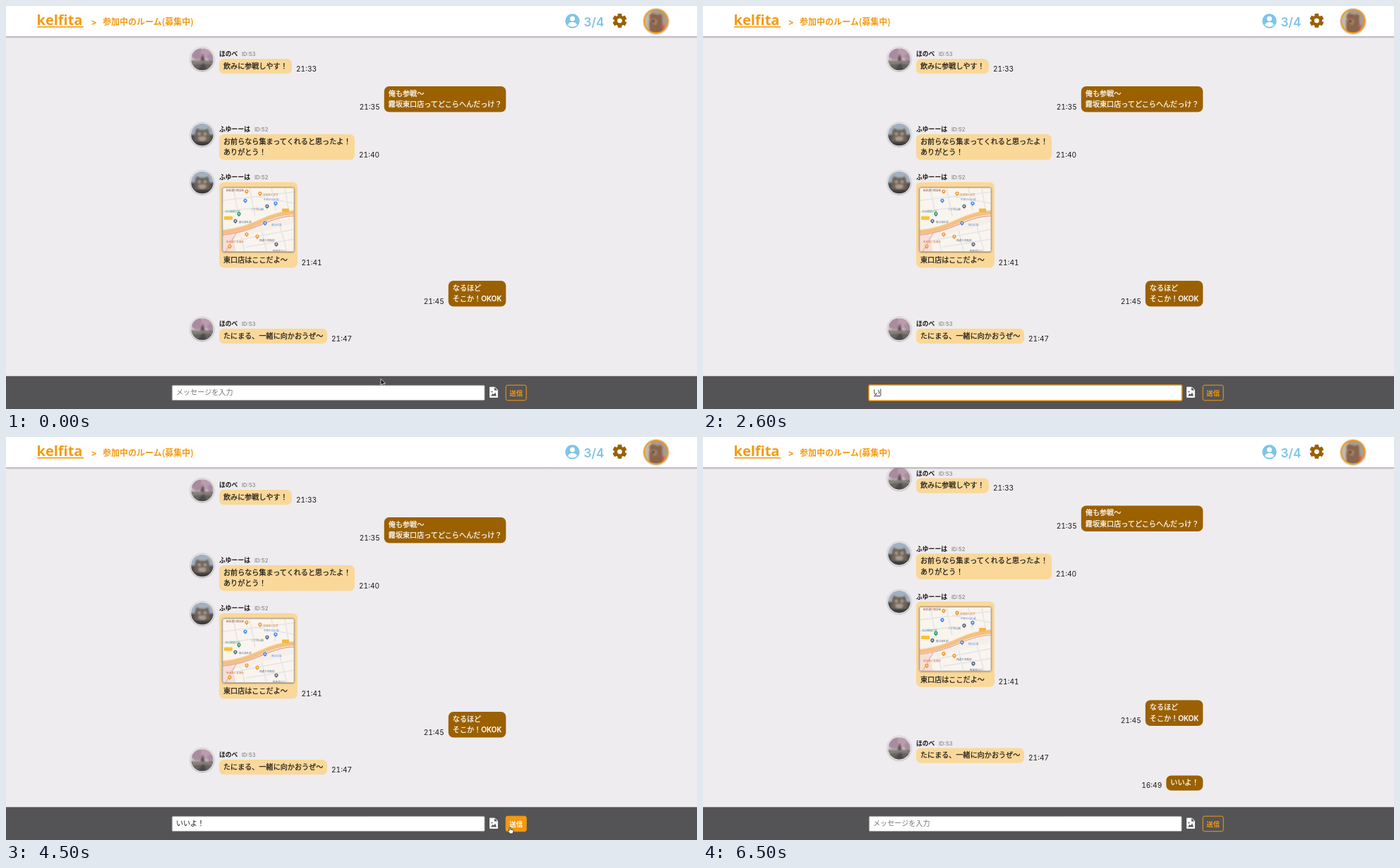
These frames come from a looping animation (979x572 px, 6.6 s). An HTML page:

```html
<!DOCTYPE html>
<html lang="ja">
<head>
<meta charset="utf-8">
<style>
html, body { margin: 0; width: 100%; height: 100%; overflow: hidden; }
svg { display: block; font: 500 10.1px Inter, "Noto Sans CJK JP", sans-serif; }
text { white-space: pre; }
.jp { font-family: "Noto Sans CJK JP", sans-serif; }
.bold { font-weight: 700; }
.time { font-size: 10.2px; font-weight: 400; font-variant-numeric: tabular-nums; }
.id { font-size: 7.6px; font-weight: 600; }
.head { font: 700 20px "Noto Sans", "Open Sans", sans-serif; }
.tiny { font-size: 3.6px; }
</style>
</head>
<body>
<svg id="stage" width="979" height="572" viewBox="0 0 979 572"></svg>
<script>
const ORANGE = '#f59a10', BROWN = '#9b6000', CREAM = '#fad899', INK = '#1d1b19', BLUE = '#7fc4e6';
const stage = document.getElementById('stage');

const rect = (x, y, w, h, fill, r = 0, more = '') =>
  `<rect x="${x}" y="${y}" width="${w}" height="${h}" rx="${r}" fill="${fill}" ${more}/>`;
const disc = (x, y, r, fill, more = '') => `<circle cx="${x}" cy="${y}" r="${r}" fill="${fill}" ${more}/>`;
const path = (d, fill, more = '') => `<path d="${d}" fill="${fill}" ${more}/>`;
// y is the vertical middle of the line
const text = (x, y, s, fill = INK, more = 'class="jp"') =>
  `<text x="${x}" y="${y + 3.7}" fill="${fill}" ${more}>${s}</text>`;
// text of medium weight
const chatText = (x, y, s, fill = INK) =>
  text(x, y, s, fill, `stroke="${fill}" stroke-width=".25"`);

const photos = {
  tree: rect(-18, -18, 36, 36, '#cfc6cd') + disc(-7, -8, 9, '#a98a9e') + disc(6, -9, 8, '#bb9cae') +
    disc(12, -3, 5, '#a98d9f') + rect(-18, 2, 36, 16, '#67625f') + path('M-3 2L1-8 4 2z', '#5c4c52') +
    path('M-18 4Q0 0 18 5V8Q0 4-18 9z', '#86817a') + path('M-10 18L2 5 8 18z', '#4b4849'),
  cat: rect(-18, -18, 36, 36, '#a4b0c0') + rect(-18, 0, 36, 18, '#51504e') +
    path('M-10 11Q-12-7-7-9L-3-7H4L8-9Q12-2 10 11z', '#6f6458') +
    disc(-4, -1, 2.3, '#a89b8a') + disc(4, -1, 2.3, '#a89b8a') +
    path('M-6 4Q0 1 6 4L4 9H-4z', '#a79c90') + rect(-18, 10, 36, 8, '#3c3d40'),
  animal: rect(-18, -18, 36, 36, '#a99c8f') + rect(-18, -18, 11, 36, '#c3b8ac') +
    path('M-9 18Q-11 4-9-4-11-10-6-11-1-11 2-9 8-12 9-7 8-2 11 18z', '#8a654d') +
    path('M-8-2Q-3-6 2-1L0 5Q-5 6-8-2z', '#a98266') + disc(-4, 0, 2, '#4a352c') +
    path('M7 10L13 4 11 12z', '#e24a4a')
};
const portrait = kind => `<g clip-path="url(#round)"><g filter="url(#blur)">${photos[kind]}</g></g>`;
const photo = (kind, x, y) => `<g transform="translate(${x} ${y})" filter="url(#soft)">` +
  disc(0, 0, 16.6, '#f7f5f5') + portrait(kind) + '</g>';

function bubble(x, y, w, lines, time, mine) {
  const h = 6 + lines.length * 15.3, ty = y + h - 7.2;
  return rect(x, y, w, h, mine ? BROWN : CREAM, 7) +
    lines.map((s, i) => chatText(x + 6, y + 10.2 + i * 15.3, s, mine ? '#fff' : INK)).join('') +
    text(mine ? x - 6 : x + w + 6, ty, time, INK, `class="time" ${mine ? 'text-anchor="end"' : ''}`);
}
const sender = (kind, y, name, id) => photo(kind, 278, y + 7.5) +
  text(302, y - .4, name, INK, 'class="jp bold" font-size="8.8"') +
  text(kind === 'tree' ? 334 : 352, y - .3, 'ID:' + id, '#929092', 'class="id"');

function map() {
  const road = (d, w = 1.3, c = '#e4e5e8') => path(d, 'none', `stroke="${c}" stroke-width="${w}"`);
  const pin = ([x, y, c]) => path(`M${x} ${y + 4}L${x - 2.4} ${y + .6}H${x + 2.4}z`, c) +
    disc(x, y, 2.6, c) + disc(x, y, .9, '#fff');
  const label = (x, y, s, c) => text(x, y - 2, s, c, 'class="jp tiny"');
  const blue = '#4b8be8', amber = '#f3992e', slate = '#5d6a83';
  return rect(306.5, 257.5, 102, 91.5, '#f9f4ee', 2, 'filter="url(#soft)"') +
    '<g clip-path="url(#mapBox)">' +
    road('M307 276L408 264M307 292L358 286M322 258L330 300M345 258L353 298M376 258L382 290M395 258L400 288M353 270L408 280', 1.6) +
    road('M330 316L338 348M360 308L369 348M385 301L398 348M320 334L408 317M340 342L408 331', 1.6) +
    path('M307 318L408 300V308L330 328 307 334z', '#f6efe9') + path('M307 326L320 322 326 349H307z', '#f6dfd9') +
    road('M311 349L326 322', 2, '#eebfb4') +
    road('M307 321Q335 318 360 306T408 293', 6, '#f3c183') +
    road('M307 318Q335 315 360 303T408 290', 1, '#f8dcae') + road('M307 325Q335 322 362 310T408 298', 1.4, '#eba79b') +
    rect(309, 298.5, 12, 5, '#f8c333', 1) + rect(391, 287.5, 10, 5, '#f5b83d', 1) +
    [[341, 263, amber], [360, 266, amber], [339, 276, blue], [382, 280, blue], [370, 284, slate],
     [330, 295, '#2f9b69'], [325, 305, slate], [367, 308, blue], [341, 324, amber], [356, 327, amber],
     [317, 341, amber], [383, 338, slate]].map(pin).join('') +
    label(312, 261, '駅前通り商店街', '#8d4942') + label(364, 267, '居酒屋と食堂', '#d1833a') +
    label(365, 274, '中央ビル広場', blue) + label(310, 291, '北公園前広場', '#3c8f6b') +
    label(347, 288, '二丁目公園', slate) + label(330, 306, '東口改札前', slate) +
    label(376, 310, '南口広場', blue) + label(312, 334, '焼き鳥と食事処', '#d1733a') +
    label(359, 332, '西通り会館前', slate) + label(378, 347, '駐車場入口', slate) + '</g>' +
    rect(306.8, 257.8, 101.4, 91, 'none', 2, 'stroke="#8d8578" stroke-width=".8"');
}

function gear(x, y) {
  const teeth = [0, 60, 120].map(a => rect(-2.9, -10, 5.8, 20, BROWN, 1, `transform="rotate(${a})"`)).join('');
  return `<g transform="translate(${x} ${y})">${teeth}${disc(0, 0, 7.6, BROWN)}${disc(0, 0, 3.4, '#fff')}</g>`;
}

stage.innerHTML = `<defs>
  <clipPath id="round"><circle r="15.8"/></clipPath>
  <clipPath id="mapBox">${rect(307, 258, 101, 90.5, '#fff', 2)}</clipPath>
  <filter id="soft" x="-30%" y="-30%" width="160%" height="160%"><feDropShadow dx="0" dy=".3" stdDeviation=".9" flood-opacity=".55"/></filter>
  <filter id="blur"><feGaussianBlur stdDeviation=".9"/></filter>
  <linearGradient id="shade" x2="0" y2="1"><stop stop-color="#777" stop-opacity=".6"/><stop offset="1" stop-color="#777" stop-opacity="0"/></linearGradient>
  </defs>` +
  rect(0, 0, 979, 572, '#eeecee') + '<g id="chat">' +
  sender('tree', 68, 'ほのべ', 53) + bubble(302, 75, 103, ['飲みに参戦しやす！'], '21:33') +
  bubble(535.8, 114, 172.5, ['俺も参戦〜', '霧坂東口店ってどこらへんだっけ？'], '21:35', true) +
  sender('cat', 175, 'ふゆーーは', 52) + bubble(302, 182, 192, ['お前らなら集まってくれると思ったよ！', 'ありがとう！'], '21:40') +
  sender('cat', 243, 'ふゆーーは', 52) + rect(302, 250, 111, 121.5, CREAM, 7) + map() +
  chatText(308, 360.5, '東口店はここだよ〜') + text(418.5, 364.3, '21:41', INK, 'class="time"') +
  bubble(626.8, 390, 81.5, ['なるほど', 'そこか！OKOK'], '21:45', true) +
  sender('tree', 451, 'ほのべ', 53) + bubble(302, 458, 153, ['たにまる、一緒に向かおうぜ〜'], '21:47') +
  `<g id="sent">${bubble(656.3, 497, 52, ['いいよ！'], '16:49', true)}</g></g>` +
  // header
  rect(0, 43, 979, 3, 'url(#shade)') + rect(0, 0, 979, 43, '#fff') +
  `<text x="43.5" y="27.3" fill="${ORANGE}" class="head">kelfita</text>` + rect(44, 28.8, 66, 1.7, ORANGE) +
  text(120.5, 23.3, '&gt;', ORANGE, 'class="bold" font-size="12"') +
  text(137, 23.2, '参加中のルーム(募集中)', ORANGE, 'class="jp bold" font-size="12"') +
  disc(802.5, 21.3, 10.2, BLUE) + disc(802.5, 18, 3.5, '#fff') + path('M795.8 27Q798 22.8 802.5 22.8T809.2 27Q802.5 32 795.8 27z', '#fff') +
  text(818.5, 25, '3/4', BLUE, 'font-size="17.2" font-weight="600"') + gear(869.5, 20.8) +
  `<g transform="translate(921 21.5)" filter="url(#soft)">${disc(0, 0, 17.6, ORANGE)}${portrait('animal')}</g>` +
  // footer
  rect(0, 525.3, 979, 47, '#545456') +
  rect(235, 538, 443.5, 22, '#fff', 1.5, 'id="field"') + text(241, 548.5, '', INK, 'id="entry" class="jp"') +
  rect(242, 553, 0, .9, INK, 0, 'id="under"') + rect(241.5, 543.5, .8, 10, INK, 0, 'id="caret"') +
  path('M685.5 541H692.5L696.5 545V555.5H685.5z', '#fff', 'stroke="#fff" stroke-width=".8" stroke-linejoin="round"') +
  path('M692 541.3V545.5H696.3M687 553.5L689.5 550 691 551.5 693 548.5 695 553.5z', '#545456') + disc(688.5, 547.5, 1, '#545456') +
  rect(708.2, 538.2, 29, 21.6, 'none', 2.5, `id="button" stroke="${ORANGE}" stroke-width="1"`) +
  text(713.3, 549, '送信', ORANGE, 'id="send" class="jp bold" font-size="9.4"') +
  '<g id="pointer">' +
  path('M0 0V9L2.1 7.2 3.5 10.3 5 9.6 3.6 6.6H6.4z', '#1a1a1a', 'id="arrow" stroke="#fff" stroke-width=".7"') +
  path('M-2-5Q0-5 0-3.8 0-5 2-5M0-4V4M-2 5Q0 5 0 3.8 0 5 2 5', 'none', 'id="beam" stroke="#222" stroke-width="1"') +
  path('M-1 .3Q0-.8 .8.4V3L4 3.7Q5.2 4 5 5.5L4 9H0L-3 5.4Q-2.6 4-1 5z', '#fff', 'id="hand" stroke="#222" stroke-width=".8"') +
  '</g>';

const el = id => document.getElementById(id);
const show = (id, on) => el(id).setAttribute('visibility', on ? 'visible' : 'hidden');
const set = (id, attrs) => { for (const k in attrs) el(id).setAttribute(k, attrs[k]); };

// [time, x, y] of the pointer
const route = [[0, 531, 529], [100, 530, 531], [500, 516, 549], [3500, 516, 549], [3800, 674, 559],
  [3900, 702.5, 552.5], [4100, 714, 554], [4700, 714, 554], [5000, 825.5, 476], [6000, 825.5, 476], [6300, 845, -14], [6600, 845, -14]];
const typed = [[2400, 'い'], [2700, 'いい'], [2900, 'いいｙ'], [3000, 'いいよ'], [3200, 'いいよ！']];
const COMMIT = 3300, FOCUS = 900, BLUR = 4400, SENT = 4800;

function pointerAt(t) {
  const i = route.findIndex(p => p[0] > t), [t0, x0, y0] = route[i - 1], [t1, x1, y1] = route[i];
  const k = (t - t0) / (t1 - t0);
  return [x0 + (x1 - x0) * k, y0 + (y1 - y0) * k];
}

function draw(t) {
  const focused = t >= FOCUS && t < BLUR, sent = t >= SENT;
  const last = typed.filter(k => k[0] <= t).pop();
  const entry = last && !sent ? last[1] : '';
  const width = entry.length * 10.1, composing = entry && t < COMMIT;
  const lastKey = t >= COMMIT ? COMMIT : last ? last[0] : FOCUS;

  set('chat', { transform: `translate(0 ${sent ? -16.6 : 0})` });
  show('sent', sent);
  set('field', focused
    ? { x: 235, y: 538, width: 443.5, height: 22, stroke: ORANGE, 'stroke-width': 1.6 }
    : { x: 235.2, y: 538.2, width: 443, height: 21.6, stroke: '#777', 'stroke-width': .8 });
  el('entry').textContent = entry || 'メッセージを入力';
  set('entry', { fill: entry ? INK : '#757575' });
  set('under', { width: composing ? width - 1 : 0 });
  set('caret', { x: 241.3 + width });
  show('caret', focused && (t - lastKey) % 1000 < 500);

  const [x, y] = pointerAt(t);
  const inside = (l, r) => x >= l && x <= r && y >= 538 && y <= 560;
  const beam = inside(235, 678) && t < 3600, hand = inside(708, 737);
  set('pointer', { transform: `translate(${x} ${y})` });
  show('beam', beam && !(t >= 2400 && t < 3500));
  show('hand', hand);
  show('arrow', !beam && !hand);
  set('button', { fill: hand ? ORANGE : 'none' });
  set('send', { fill: hand ? '#fff' : ORANGE });
}

const start = performance.now();
function frame() {
  draw(Math.floor((performance.now() - start) % 6600 / 100) * 100);
  requestAnimationFrame(frame);
}
frame();
</script>
</body>
</html>
```
